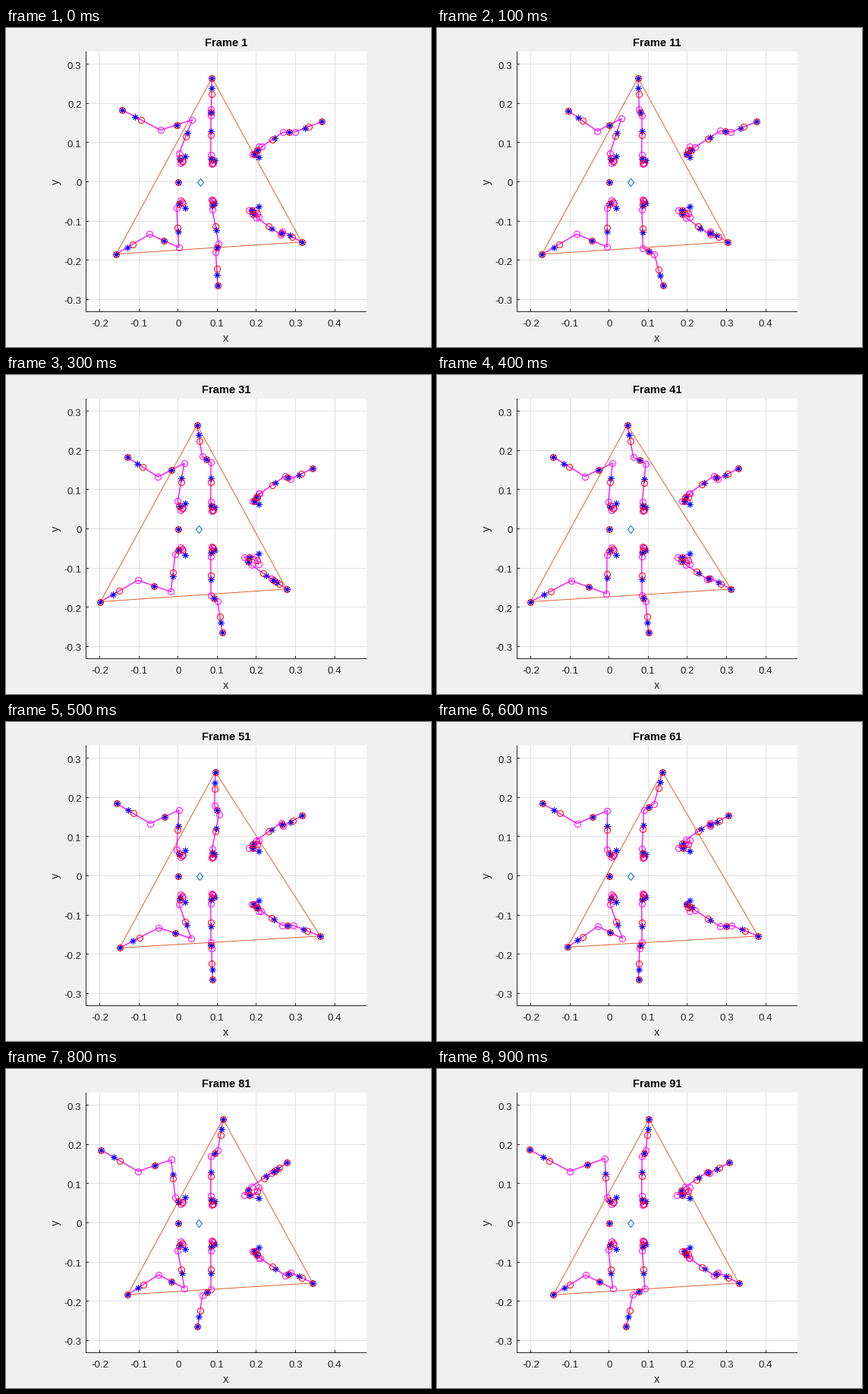
Recreate the animation shown at these times as a matplotlib script. Size 560 px wide and 420 px high, loop 1 s.

```python
import numpy as np
import matplotlib.pyplot as plt
from matplotlib.animation import FuncAnimation
from matplotlib.patches import Rectangle

W, H = 560, 420
PX = 0.72                      # points per pixel at 100 dpi
CYCLE = 102                    # simulation steps per gait cycle
TOUCH_DOWN = 62                # step at which a swinging foot lands
STEPS = 10                     # simulation steps per picture
X0, Y0, SCALE = 226.7, 202.5, 516
LEFT, RIGHT, TOP, BOTTOM = 105, 474, 31, 373
DARK = "#262626"

plt.rcParams["font.family"] = "Liberation Sans"


def gait(phase, back, front, lift_off=36):
    """Foot x and lift (0 to 1): eased swing forward, even push back."""
    swing = TOUCH_DOWN - lift_off
    t = (phase - lift_off) % CYCLE
    if t < swing:
        angle = np.pi * t / swing
        return back + (front - back) * (1 - np.cos(angle)) / 2, np.sin(angle)
    return front - (front - back) * (t - swing) / (CYCLE - swing), 0.0


# Each leg gives its joints, the mass of its base link and the relative mass
# positions on the other links, in pixels, for the upper half of the stage.

def rear_leg(phase):
    foot, lift = gait(phase, 120.3, 172.7)
    reach = foot - 146
    knee = 228 + 0.5 * reach + 14.5 * lift
    ankle = 190 + 0.76 * reach + 8.7 * lift
    joints = [(233.2, 174.5), (230.2, 178),
              (225 + 0.19 * (knee - 228), 167.5 - 0.17 * (knee - 228)),
              (knee, 115.9 + 0.0215 * (knee - 230.5) ** 2),
              (ankle, 133.5 + 0.005 * (ankle - 190) ** 2),
              (foot, 107.4 + 0.043 * reach)]
    return joints, (236.2, 168.5), (0.4, 0.6, 0.5, 0.66)


def middle_leg(phase):
    foot, lift = gait(phase, 247.8, 297.8)
    knee = 270.1 + 10.5 * lift
    ankle = 271.3 + 0.6 * (foot - 273) + 1.7 * lift
    joints = [(273.2, 177.5), (271.4, 179), (269.7 + 2 * lift, 166.5),
              (knee, 115.2 + 6.5 * lift ** 2),
              (ankle, 107.4 + 2.6 * lift ** 2), (foot, 65.7)]
    return joints, (275.2, 174), (0.6, 0.6, 0.5, 0.68)


def front_leg(phase):
    foot, lift = gait(phase, 367.5, 416.3, lift_off=33)
    foot += 16 * np.sqrt(lift)
    reach = foot - 391
    knee = 363 + 0.37 * reach - 8.2 * lift
    ankle = 365.5 + 0.735 * reach - 3.6 * lift
    slide = 320.7 + 0.86 * (knee - 363) + 3 * lift
    hip = slide + 9.7 + 2 * lift
    joints = [(333.2, 156), (328.7, 165.5), (slide, 165.5),
              (hip, 155.5 + 0.15 * (hip - 330)),
              (knee, 132.5 + 0.015 * (knee - 361) ** 2 + 5 * lift),
              (ankle, 137), (foot, 123.2)]
    return joints, (332.7, 170), (0.5, 0.55, 0.61, 0.5, 0.38)


# (leg, lower side, phase shift): two alternating tripods
LEGS = [(middle_leg, False, 0), (rear_leg, True, 0), (front_leg, True, 0),
        (middle_leg, True, 51), (rear_leg, False, 51), (front_leg, False, 51)]


def solve_leg(leg, lower, phase):
    """Return joints, link centres and mass centres of one leg."""
    chain, base_mass, ratios = leg(phase)
    joints = np.array(chain)
    start, end = joints[:-1], joints[1:]
    centres = np.vstack([(start + end) / 2, end[-1:]])
    r = np.array(ratios)[:, None]
    masses = np.vstack([[base_mass], start[1:] + r * (end - start)[1:], end[-1:]])
    if lower:
        for points in (joints, centres, masses):
            points[:, 1] = 2 * Y0 - points[:, 1]
    return joints, centres, masses


fig = plt.figure(figsize=(W / 100, H / 100), dpi=100, facecolor="#F0F0F0")
ax = fig.add_axes([0, 0, 1, 1])
ax.set_xlim(0, W)
ax.set_ylim(H, 0)
ax.axis("off")


def segment(x1, y1, x2, y2, color):
    """One-pixel line through pixel centres."""
    xs, ys = np.floor([x1, x2]) + 0.5, np.floor([y1, y2]) + 0.5
    ax.plot(xs, ys, color=color, lw=PX, zorder=1, snap=False,
            solid_capstyle="projecting")


def label(x, y, text, size=13.33, color=DARK, **kw):
    kw = {"ha": "center", "va": "baseline", **kw}
    return ax.text(x, y, text, fontsize=size * PX, color=color, **kw)


ax.add_patch(Rectangle((LEFT, TOP), RIGHT - LEFT + 1, BOTTOM - TOP + 1,
                       facecolor="white", lw=0, zorder=0))
x_ticks = [(X0 + SCALE * k / 10, f"{k / 10:g}") for k in range(-2, 5)]
y_ticks = [(Y0 - SCALE * k / 10, f"{k / 10:g}") for k in range(-3, 4)]
for x, _ in x_ticks:
    segment(x, TOP, x, BOTTOM, "#DFDFDF")
for y, _ in y_ticks:
    segment(LEFT, y, RIGHT, y, "#DFDFDF")
for x, text in x_ticks:
    segment(x, BOTTOM - 3, x, BOTTOM, DARK)
    label(x, 393, text)
for y, text in y_ticks:
    segment(LEFT, y, LEFT + 3, y, DARK)
    label(99.5, y + 6, text, ha="right")
segment(LEFT, TOP, LEFT, BOTTOM, DARK)
segment(LEFT, BOTTOM, RIGHT, BOTTOM, DARK)
label(290, 413, "x", 14.67)
label(66, Y0, "y", 14.67, va="center", rotation=90)
title = label(290, 24, "", 14.67, "black", weight="bold")


def markers(shape, color, size, zorder):
    return ax.plot([], [], ls="none", marker=shape, mfc="none", mec=color,
                   ms=size * PX, mew=PX, zorder=zorder)[0]


support, = ax.plot([], [], color="#D95319", lw=0.9 * PX, zorder=2)
limbs = [ax.plot([], [], color="magenta", lw=1.3 * PX, zorder=3)[0] for _ in LEGS]
joint_marks = markers("o", "magenta", 8, 4)
mass_marks = markers((8, 2, 0), "blue", 8, 5)
link_marks = markers("o", "red", 8, 6)
body_mass = markers([(0, -5), (4, 0), (0, 5), (-4, 0), (0, -5)], "#0072BD", 10, 4)


def draw(i):
    step = i * STEPS
    title.set_text(f"Frame {step + 1}")
    solved = [solve_leg(leg, lower, step + shift) for leg, lower, shift in LEGS]
    for line, (joints, _, _) in zip(limbs, solved):
        line.set_data(*joints.T)
    origin = [[X0, Y0]]
    joint_marks.set_data(*np.vstack([s[0][:-1] for s in solved]).T)
    link_marks.set_data(*np.vstack([s[1] for s in solved] + [origin]).T)
    mass_marks.set_data(*np.vstack([s[2] for s in solved] + [origin]).T)
    feet = np.array([s[0][-1] for s in solved[:3]])
    support.set_data(*feet[[0, 1, 2, 0]].T)
    body_mass.set_data([254.6 + 0.9 * np.cos(2 * np.pi * step / 51)], [Y0])
    return [title, support, joint_marks, link_marks, mass_marks, body_mass, *limbs]


anim = FuncAnimation(fig, draw, frames=10, interval=100, repeat=True,
                     repeat_delay=0, blit=False)
plt.show()
```
